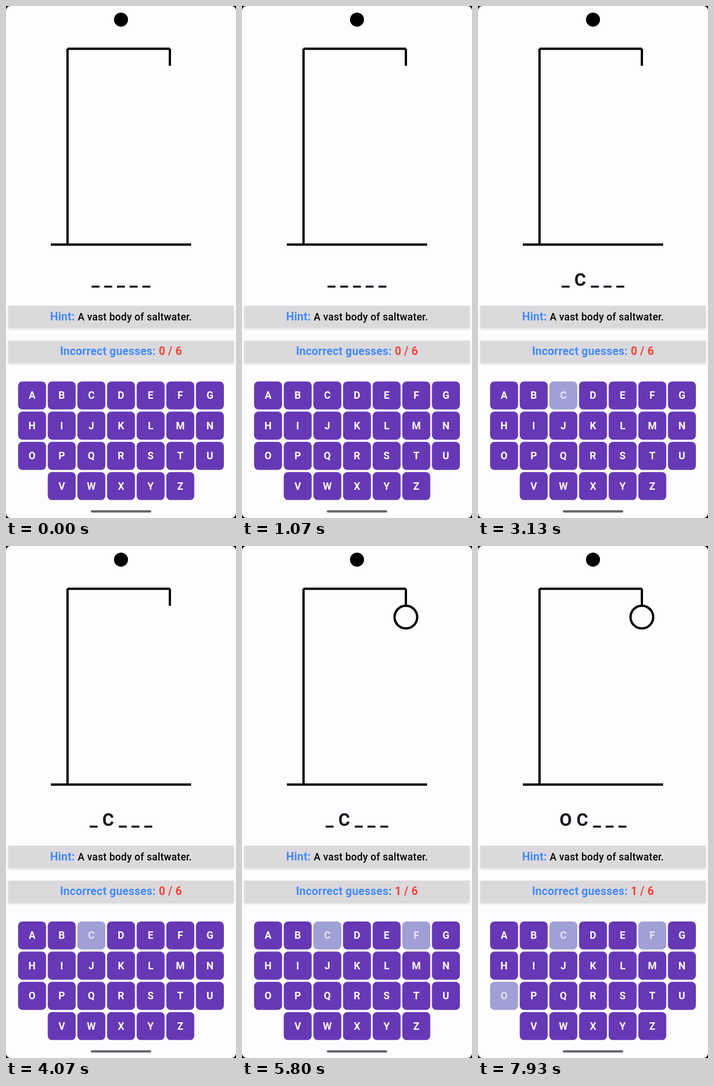
An HTML page that plays this animation: 400 px wide and 889 px high, repeating every 8000 ms.

```html
<!DOCTYPE html>
<html lang="en">
<head>
<meta charset="utf-8">
<title>Hangman</title>
<style>
  html, body { margin: 0; width: 100%; height: 100%; overflow: hidden; background: #000; }
  svg { display: block; width: 100vw; height: 100vh; }
  text { font-family: Roboto, sans-serif; font-weight: 700; text-anchor: middle; letter-spacing: .243px; white-space: pre; }
  .bar { fill: #dbd9dc; filter: drop-shadow(0 2px 2px rgba(0, 0, 0, .16)); }
  .line { fill: none; stroke: #000; stroke-width: 4; }
  .label { font-size: 19.44px; fill: #448aff; }
  .hint { font-size: 17.5px; font-weight: 500; fill: #000; }
  .count { fill: #f44336; }
  .word { font-size: 31.1px; fill: #1d1b20; }
  .key text { font-size: 17.5px; letter-spacing: .1px; fill: #fff; }
</style>
</head>
<body>
<svg viewBox="0 0 400 889">
  <rect width="400" height="889" rx="8" fill="#fefcff"/>
  <circle cx="200" cy="23.7" r="12.2"/>
  <path class="line" d="M78 414.3H322M107 414.3V74.3M107 74.3H285M285 74.3V103.7"/>
  <circle id="head" class="line" cx="285" cy="123.4" r="19.7"/>
  <text id="word" class="word" x="200" y="486.4"></text>
  <rect class="bar" x="4" y="520.5" width="392" height="38"/>
  <text class="label" x="200" y="546">Hint: <tspan class="hint">A vast body of saltwater.</tspan></text>
  <rect class="bar" x="4" y="581" width="392" height="38"/>
  <text class="label" x="200" y="606.4">Incorrect guesses: <tspan id="count" class="count"></tspan></text>
  <g id="keys"></g>
  <rect x="147.5" y="875.6" width="105" height="3.8" rx="1.9" fill="#656368"/>
</svg>
<script>
const LOOP = 8000;
const FADE = 200;
const ANSWER = "OCEAN";
const GUESSES = { C: 2200, F: 5350, O: 7000 };
const ENABLED = [102, 56, 182];
const DISABLED = [159, 160, 213];
const NS = "http://www.w3.org/2000/svg";

const byId = id => document.getElementById(id);
const head = byId("head"), word = byId("word"), count = byId("count");

function add(parent, tag, attrs) {
  const node = document.createElementNS(NS, tag);
  for (const name in attrs) node.setAttribute(name, attrs[name]);
  return parent.appendChild(node);
}

const keys = {};
["ABCDEFG", "HIJKLMN", "OPQRSTU", "VWXYZ"].forEach((row, r) => {
  [...row].forEach((letter, c) => {
    const x = 200 + (c - (row.length - 1) / 2) * 51.55;
    const y = 676.2 + r * 52.45;
    const group = add(byId("keys"), "g", { class: "key" });
    const face = add(group, "rect", { x: x - 24.3, y: y - 24.3, width: 48.6, height: 48.6, rx: 7.5 });
    const label = add(group, "text", { x, y: y + 6.2 });
    label.textContent = letter;
    keys[letter] = { face, label };
  });
});

function render(t) {
  const guessed = letter => t >= GUESSES[letter];
  const misses = Object.keys(GUESSES).filter(l => guessed(l) && !ANSWER.includes(l)).length;

  for (const letter in keys) {
    const p = guessed(letter) ? Math.min(1, (t - GUESSES[letter]) / FADE) : 0;
    const rgb = ENABLED.map((v, i) => Math.round(v + (DISABLED[i] - v) * p));
    keys[letter].face.setAttribute("fill", `rgb(${rgb})`);
    keys[letter].label.setAttribute("fill-opacity", 1 - 0.28 * p);
  }
  word.textContent = [...ANSWER].map(l => guessed(l) ? l : "_").join(" ");
  count.textContent = `${misses} / 6`;
  head.setAttribute("visibility", misses ? "visible" : "hidden");
}

const start = performance.now();
function tick() {
  render((performance.now() - start) % LOOP);
  requestAnimationFrame(tick);
}
tick();
</script>
</body>
</html>
```
